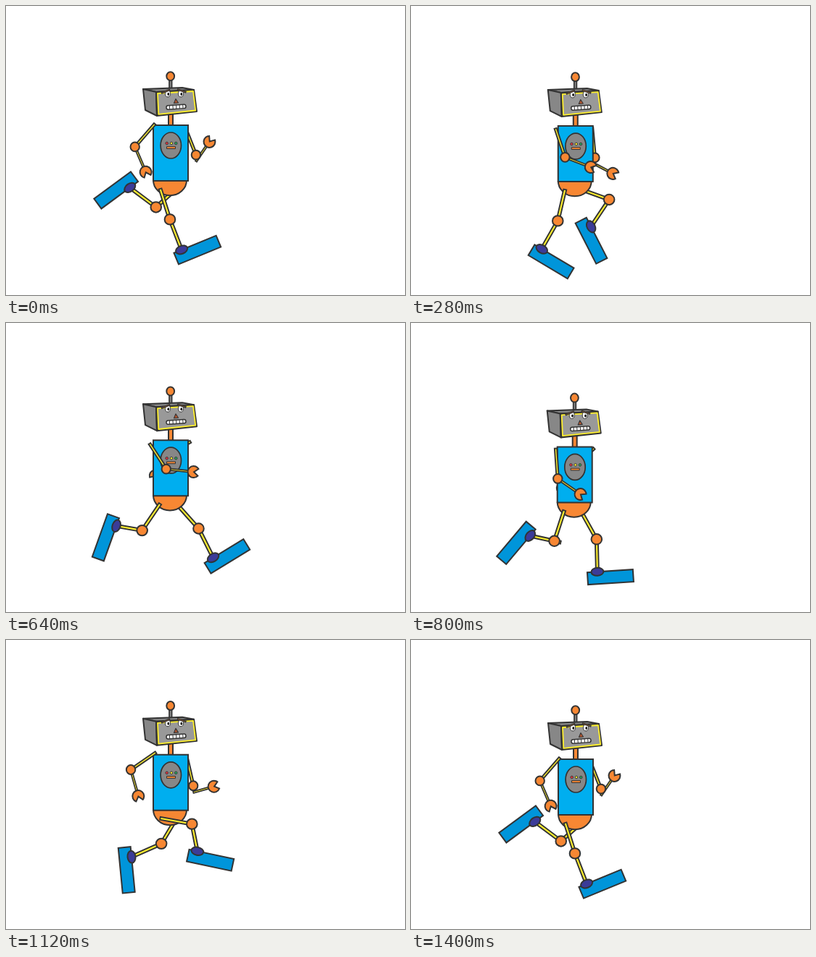
Write an HTML page with a canvas that moves like this. It is 550 px wide and 400 px high and loops after 1.44 s.

```html
<!DOCTYPE html>
<html>
<head>
<meta charset="utf-8">
<style>
  html, body { margin: 0; width: 100%; height: 100%; overflow: hidden; background: #fff; }
  canvas { display: block; }
</style>
</head>
<body>
<canvas id="stage" width="550" height="400"></canvas>
<script>
const ctx = document.getElementById('stage').getContext('2d');
const INK = '#333', ORANGE = '#f78733', YELLOW = '#fff02d', SKY = '#00aeef',
      FOOT = '#0095da', GRAY = '#878787', INDIGO = '#3b3b98';
const CYCLE = 1400, HALF = CYCLE / 2, LOOP = 1440, STEP = 40;

// Height of the body during one step: time, y
const BOUNCE = [[0, 0], [120, 7], [260, 2], [400, -5.3], [520, -9], [640, -2.8]];

// One stride, shared by both legs half a cycle apart: time, thigh, shank, foot.
// Limb angles are degrees forward from straight down.
const STRIDE = [
  [0, 17.6, 21, -22.5], [120, 29.5, -2.5, 0], [260, -9, -25, 24.5], [410, -30, -64, 82],
  [640, -34, -100, 109.6], [700, -48, -127, 143.5], [820, -9, -95, 124], [960, 64.5, -41, 70.7],
  [1110, 80, 9, 15], [1340, 41.6, 26.5, -31.5]
];

// Smooth periodic curve through key points.
function curve(keys, period, t) {
  t %= period;
  const n = keys.length;
  const at = i => keys[(i + n) % n];
  const time = i => at(i)[0] + period * Math.floor(i / n);
  let i = n - 1;
  while (keys[i][0] > t) i--;
  const span = time(i + 1) - time(i), u = (t - time(i)) / span;
  return at(i).slice(1).map((a, c) => {
    const value = k => at(k)[c + 1];
    const rate = k => (value(k + 1) - value(k)) / (time(k + 1) - time(k));
    const slope = k => {
      const before = time(k) - time(k - 1), after = time(k + 1) - time(k);
      return (rate(k - 1) * after + rate(k) * before) / (before + after);
    };
    const b = value(i + 1), m0 = slope(i) * span, m1 = slope(i + 1) * span;
    return a + u * (m0 + u * (3 * (b - a) - 2 * m0 - m1 + u * (2 * (a - b) + m0 + m1)));
  });
}

const rad = degrees => degrees * Math.PI / 180;
const wave = t => Math.cos(2 * Math.PI * t / CYCLE);
const fold = t => (1 - wave(t)) / 2;
const limb = ([x, y], length, angle) =>
  [x + length * Math.sin(rad(angle)), y + length * Math.cos(rad(angle))];

function paint(fill, width = 2, stroke = INK) {
  ctx.fillStyle = fill;
  ctx.fill();
  if (!width) return;
  ctx.strokeStyle = stroke;
  ctx.lineWidth = width;
  ctx.stroke();
}
function box(x, y, w, h, fill, width) {
  ctx.beginPath();
  ctx.rect(x, y, w, h);
  paint(fill, width);
}
function oval(x, y, rx, ry, fill, width) {
  ctx.beginPath();
  ctx.ellipse(x, y, rx, ry, 0, 0, 7);
  paint(fill, width);
}
function poly(points, fill, width, stroke) {
  ctx.beginPath();
  for (const [x, y] of points) ctx.lineTo(x, y);
  ctx.closePath();
  ctx.lineJoin = 'round';
  paint(fill, width, stroke);
  ctx.lineJoin = 'miter';
}
function placed([x, y], angle, draw) {
  ctx.save();
  ctx.translate(x, y);
  ctx.rotate(rad(angle));
  draw();
  ctx.restore();
}
// A bar that starts at a joint and points along a limb angle.
function rod(joint, length, angle, thick = 4, width = 1.9, fill = YELLOW) {
  placed(joint, 90 - angle, () => box(0, -thick / 2, length, thick, fill, width));
}

function leg(hip, t, thighLength, shankLength, heel) {
  const [thigh, shank, foot] = curve(STRIDE, CYCLE, t);
  const knee = limb(hip, thighLength, thigh), ankle = limb(knee, shankLength, shank);
  rod(hip, thighLength, thigh);
  rod(ankle, Math.max(43, shankLength), shank + 180);
  oval(...knee, 7.3, 7.2, ORANGE);
  placed(ankle, foot, () => {
    box(-heel, 0, 63, 17, FOOT);
    oval(0, 0, 8.5, 5.5, INDIGO);
  });
}

function arm(shoulder, upper, fore, foreLength, drop) {
  const elbow = limb(shoulder, 42, upper);
  const joint = [elbow[0], elbow[1] + drop], hand = limb(joint, foreLength, fore);
  rod(shoulder, 42, upper, 3.3);
  rod(joint, foreLength, fore, 2.5, 1.7);
  oval(...elbow, 6.2, 6.4, ORANGE);
  placed(hand, 90 - fore, () => {
    ctx.beginPath();
    ctx.arc(0, 0, 8, 0.65, 2 * Math.PI - 0.65);
    ctx.lineTo(0.5, 0);
    ctx.closePath();
    paint(ORANGE);
  });
}

function nearArm(t) {
  const back = wave(t - 1205);
  arm([202 + 5 * back, 166 - 4.5 * back], -8.5 - 50.5 * back, 45 - 40 * back + 9 * back ** 2, 38, 0);
}
function farArm(t) {
  const front = wave(t - 1370);
  arm([250.5 - 4 * front, 167], -1.5 + 41 * front - 18 * front ** 2,
      57 + 95 * Math.tanh(2 * front - 0.3), 27 + 6 * front, 9);
}

function torso() {
  box(224, 146, 6, 20, ORANGE);
  ctx.beginPath();
  ctx.ellipse(226, 241, 23, 21.3, 0, 0, Math.PI);
  paint(ORANGE);
  box(203, 165, 48, 77, SKY);
  oval(227.3, 193, 14.2, 18, GRAY, 1.7);
  ['#e8343f', '#ffe92e', '#27a660'].forEach((c, i) => oval(221.7 + i * 6.3, 190, 1.8, 1.8, c, 0.9));
  box(221.5, 194.7, 12, 2.8, ORANGE, 1);
}

function head() {
  box(225, 101, 3.6, 13, GRAY, 1.7);
  oval(226.7, 97.2, 5.4, 6, ORANGE);
  poly([[189, 115], [243, 113], [259, 116], [207, 119]], GRAY);
  poly([[189, 115], [207, 119], [208, 152], [192, 144]], GRAY);
  poly([[207, 119], [259, 116], [263, 146], [208, 152]], INK);
  poly([[209, 121], [258, 118], [261.2, 144.5], [210.3, 149.8]], '#999', 1.8, YELLOW);
  for (const x of [223, 241]) {
    oval(x, 121.3, 3.5, 4.6, '#fff', 1);
    oval(x + 0.8, 122, 1.4, 2, '#111', 0);
  }
  rod([214.5, 120.5], 12, 112, 1.5, 1.2, ORANGE);
  rod([236.5, 115.5], 12, 72, 1.5, 1.2, ORANGE);
  poly([[234, 128.5], [237.5, 134], [231.5, 134.5]], '#b5562f', 1.1);
  placed([234.5, 139.7], -4, () => {
    ctx.beginPath();
    ctx.roundRect(-13.5, -2.7, 27, 5.4, 2.5);
    paint('#fff', 1.5);
    for (let x = -9; x < 13; x += 4.6) box(x, -2.4, 0, 4.8, INK, 1);
  });
}

function render(now) {
  const t = Math.floor(now % LOOP / STEP) * STEP % CYCLE;
  const [dip] = curve(BOUNCE, HALF, t);
  ctx.clearRect(0, 0, 550, 400);
  placed([-0.2 * Math.max(0, dip), dip], 0, () => {
    farArm(t);
    leg([235, 253], t + HALF, 46 - 8 * fold(t + HALF), 45, 14);
    torso();
    head();
    leg([212.5, 253], t, 44.5, 46 - 12 * fold(t - 130), 11.5);
    nearArm(t);
  });
}

const start = performance.now();
function tick() {
  render(performance.now() - start);
  requestAnimationFrame(tick);
}
tick();
</script>
</body>
</html>
```
